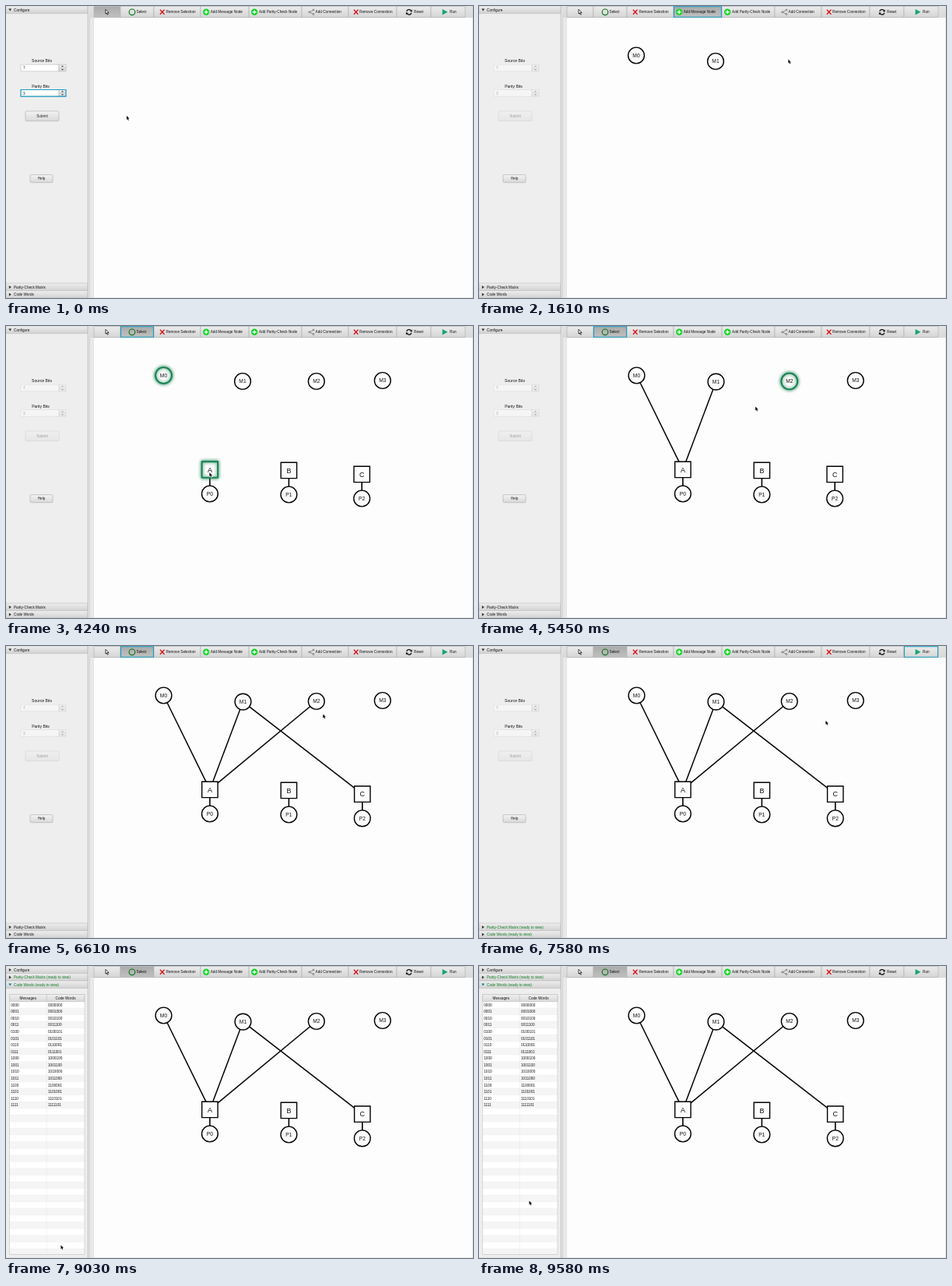
Write an HTML page with a canvas that moves like this. It is 600x375 px and loops after 10 s.

```html
<!DOCTYPE html>
<html lang="en">
<head>
<meta charset="utf-8">
<title>Parity-check graph editor</title>
<style>
html, body { margin: 0; width: 100%; height: 100%; overflow: hidden; background: #fdfdfd; }
canvas { display: block; width: 600px; height: 375px; }
</style>
</head>
<body>
<canvas id="stage" width="600" height="375"></canvas>
<script>
const ctx = document.getElementById('stage').getContext('2d');
const LOOP = 10000, STEP = 30;
const BAR = 9.5, OPEN = 346.5, PANEL = 105;
const GREEN = '#0d7a22', FOCUS = '#1b9cc4', GLOW = '#14804f';

const node = (x, y, at, dx = 0, dy = 0, parity = '') => ({ x, y, at, dx, dy, parity });
const nodes = {
  M0: node(202, 63.5, 1150, .5),
  M1: node(304, 71, 1400, .5, .6),
  M2: node(398.8, 71, 1640),
  M3: node(483.8, 70, 1950),
  A: node(261.3, 184.7, 2560, .6, -.3, 'P0'),
  B: node(363.4, 185.4, 2820, 0, 0, 'P1'),
  C: node(457.2, 190.4, 3120, .6, -.2, 'P2')
};

const spot = (x, y) => ({ x, y });
const spots = {
  start: spot(155, 141), submit: spot(46, 141), message: spot(280, 8),
  check: spot(346, 8), canvas: spot(411.2, 188), select: spot(170, 8),
  low: spot(261.4, 188.2), connect: spot(410, 9), drift: spot(407.3, 87.5),
  run: spot(570, 8), matrix: spot(74, 358), codes: spot(74, 368),
  table: spot(65, 344), end: spot(64.5, 301.5)
};
for (const name in nodes) spots[name] = spot(nodes[name].x - 1.4, nodes[name].y - 2.4);

// Pointer stops as place@arrival, with an optional +wait
const stops = `start@0+150 submit@450+110 message@900+80 M0@1130 M1@1370 M2@1590+80
  M3@1920 check@2240 A@2530 B@2790 canvas@2960+30 C@3090 select@3470 M0@3800
  low@4130+130 connect@4420 M1@4660 A@4880 connect@5110 M2@5330 A@5570
  connect@5820 M1@5990 C@6150 connect@6400 drift@6590 run@7000+400
  matrix@7950+180 codes@8300+530 table@9270+0 end@9560`
  .split(/\s+/).map(entry => {
    const [place, at, wait = 50] = entry.split(/[@+]/);
    return { ...spots[place], at: +at, leave: +at + +wait };
  });

// Each pair is picked node by node, then joined
const pair = (a, fromA, b, fromB, joined) => ({ from: { [a]: fromA, [b]: fromB }, ends: [a, b], joined });
const pairs = [
  pair('M0', 3830, 'A', 4140, 4440),
  pair('M1', 4680, 'A', 4910, 5140),
  pair('M2', 5350, 'A', 5600, 5840),
  pair('M1', 6010, 'C', 6170, 6430)
];

const tool = (left, iconX, textX, label, icon) => ({ left, iconX, textX, label, icon });
const tools = [
  tool(113, 130, 0, '', 'arrow'),
  tool(147, 162, 167.5, 'Select', 'ring'),
  tool(190, 200.7, 205.5, 'Remove Selection', 'cross'),
  tool(250, 257.2, 262.7, 'Add Message Node', 'plus'),
  tool(312, 319.2, 325, 'Add Parity-Check Node', 'plus'),
  tool(380, 392.5, 397.5, 'Add Connection', 'link'),
  tool(440, 449.7, 454, 'Remove Connection', 'cross'),
  tool(502, 517.8, 524, 'Reset', 'cycle'),
  tool(546, 563.8, 570, 'Run', 'play')
];
const toolRight = i => i + 1 < tools.length ? tools[i + 1].left : 590;

const ramp = (t, start, length) => Math.max(0, Math.min(1, (t - start) / length));

function text(label, x, y, size = 4.7, color = '#111', align = 'left') {
  ctx.save();
  ctx.translate(x, y + size * .36);
  ctx.scale(.1, .1);
  ctx.font = `${size * 10}px "Liberation Sans", Arial, sans-serif`;
  ctx.textAlign = align;
  ctx.fillStyle = color;
  ctx.fillText(label, 0, 0);
  ctx.restore();
}

function paint(fill, stroke, lineWidth = 1) {
  if (fill) { ctx.fillStyle = fill; ctx.fill(); }
  if (stroke) { ctx.strokeStyle = stroke; ctx.lineWidth = lineWidth; ctx.stroke(); }
}

function rect(x, y, w, h, fill, stroke, lineWidth = .6) {
  ctx.beginPath();
  ctx.rect(x, y, w, h);
  paint(fill, stroke, lineWidth);
}

function poly(points, fill, stroke, lineWidth, open) {
  ctx.beginPath();
  points.forEach(([x, y]) => ctx.lineTo(x, y));
  if (!open) ctx.closePath();
  paint(fill, stroke, lineWidth);
}

function line(x1, y1, x2, y2, color, width) {
  poly([[x1, y1], [x2, y2]], null, color, width, true);
}

function circle(x, y, r, fill, stroke, width) {
  ctx.beginPath();
  ctx.arc(x, y, r, 0, Math.PI * 2);
  paint(fill, stroke, width);
}

function shade(y, h, top, bottom) {
  const g = ctx.createLinearGradient(0, y, 0, y + h);
  g.addColorStop(0, top);
  g.addColorStop(1, bottom);
  return g;
}

function clipped(y, h, draw) {
  if (h <= 0) return;
  ctx.save();
  ctx.beginPath();
  ctx.rect(0, y, PANEL, h);
  ctx.clip();
  draw();
  ctx.restore();
}

function pointer(x, y, scale, fill, stroke, width) {
  const shape = [[0, 0], [0, 5.2], [1.2, 4.2], [2.1, 6.2], [3, 5.8], [2.1, 3.9], [3.7, 3.8]];
  ctx.lineJoin = 'round';
  poly(shape.map(([px, py]) => [x + px * scale, y + py * scale]), fill, stroke, width);
  ctx.lineJoin = 'miter';
}

const icons = {
  arrow(x, y) { pointer(x - 2, y - 3.5, 1.1, '#fff', '#111', .8); },
  ring(x, y) { circle(x, y, 3.8, null, '#0b7a1d', 1.2); },
  cross(x, y) {
    for (const s of [-1, 1]) line(x - 2.8 * s, y - 3, x + 2.8 * s, y + 3, '#d8161b', 1.4);
  },
  plus(x, y) {
    circle(x, y, 4.2, '#16d62a');
    line(x - 2.5, y, x + 2.5, y, '#fff', 1.3);
    line(x, y - 2.5, x, y + 2.5, '#fff', 1.3);
  },
  link(x, y) {
    for (const s of [-1, 1]) {
      line(x - 2.5, y, x + 2.3, y + 2.6 * s, '#666', .7);
      circle(x + 2.5, y + 2.7 * s, 1, '#ddd', '#555', .6);
    }
    circle(x - 2.8, y, 1, '#ddd', '#555', .6);
  },
  cycle(x, y) {
    for (const turn of [0, Math.PI]) {
      ctx.save();
      ctx.translate(x, y);
      ctx.rotate(turn);
      ctx.beginPath();
      ctx.arc(0, 0, 3.2, Math.PI * 1.08, Math.PI * 1.8);
      paint(null, '#111', 1.2);
      poly([[3.9, -3.4], [3.9, -.4], [1, -.9]], '#111');
      ctx.restore();
    }
  },
  play(x, y) { poly([[x - 3.2, y - 3.7], [x + 3.7, y], [x - 3.2, y + 3.7]], '#16a673'); }
};

function toolbar(t) {
  rect(107, 0, 493, 15, shade(0, 15, '#e3e3e3', '#d9d9d9'));
  const active = t < 950 ? 0 : t < 2270 ? 3 : t < 3500 ? 4 : 1;
  const focused = t < 950 ? -1 : t < 7040 ? active : t < 8090 ? 8 : -1;
  tools.forEach(({ left, iconX, textX, label, icon }, i) => {
    const fill = i === active ? shade(0, 15, '#aaa', '#c0c0c0') : shade(0, 15, '#ededed', '#d4d4d4');
    rect(left, .4, toolRight(i) - left, 14.2, fill, '#b2b2b2', .7);
    icons[icon](iconX, 7.8);
    if (label) text(label, textX, 7.8);
  });
  if (focused >= 0) {
    const { left } = tools[focused];
    rect(left + .5, .8, toolRight(focused) - left - 1, 13.4, null, FOCUS, 1.1);
  }
}

function button(label, x, y, w, h) {
  ctx.beginPath();
  ctx.roundRect(x, y, w, h, 1.2);
  paint(shade(y, h, '#f3f3f3', '#d9d9d9'), '#b4b4b4', .7);
  text(label, x + w / 2, y + h / 2, 4.7, '#222', 'center');
}

function spinner(value, y, focus) {
  rect(19, y - 4.3, 49, 8.6, '#fff', '#bcbcbc');
  rect(68, y - 4.3, 9, 8.6, shade(y - 4.3, 8.6, '#f2f2f2', '#d6d6d6'), '#b4b4b4');
  line(68, y, 77, y, '#b4b4b4', .5);
  for (const s of [-1, 1]) poly([[71, y + 1.4 * s], [72.5, y + 3 * s], [74, y + 1.4 * s]], '#333');
  text(value, 22, y + .1, 4.7, '#222');
  if (focus) rect(19, y - 4.3, 58, 8.6, null, FOCUS, 1.1);
}

function configure(shift, submitted) {
  ctx.save();
  ctx.translate(0, -shift);
  text('Source Bits', 46, 69.8, 5.05, '#111', 'center');
  text('Parity Bits', 44.5, 102.8, 5.05, '#111', 'center');
  button('Help', 31, 216.7, 29, 10);
  ctx.globalAlpha = submitted ? .38 : 1;
  spinner('7', 79.5, false);
  spinner('3', 111.8, !submitted);
  button('Submit', 25, 135, 43, 12.7);
  ctx.restore();
}

function codeTable(top) {
  const y0 = top + 8, rowH = 8.58, y1 = y0 + 9.2, bottom = top + 342;
  for (let i = 0; y1 + i * rowH < bottom; i++) {
    const y = y1 + i * rowH, h = Math.min(rowH, bottom - y);
    rect(4.5, y, 96.5, h, i % 2 ? '#f5f5f5' : '#fff');
    line(4.5, y + h, 101, y + h, '#e6e6e6', .5);
    if (i > 15) continue;
    const bits = i.toString(2).padStart(4, '0');
    const [a, b, c] = [...bits].map(Number);
    text(bits, 6.2, y + 4.3);
    text(`${bits}${a ^ b ^ c}0${b}`, 54, y + 4.3);
  }
  rect(4.5, y0, 96.5, 9.2, shade(y0, 9.2, '#f0f0f0', '#d8d8d8'), '#bbb', .5);
  line(52.2, y0, 52.2, y1, '#bbb', .6);
  line(52.2, y1, 52.2, bottom, '#e2e2e2', .5);
  text('Messages', 28.3, y0 + 4.7, 4.7, '#111', 'center');
  text('Code Words', 76.5, y0 + 4.7, 4.7, '#111', 'center');
  rect(4.5, y0, 96.5, bottom - y0, null, '#c4c4c4', .6);
}

function titleBar(label, y, open, color, focused) {
  rect(0, y, PANEL, BAR, shade(y, BAR, '#eee', '#d2d2d2'), '#bdbdbd', .6);
  ctx.save();
  ctx.translate(5.2, y + 4.9);
  ctx.rotate(open * Math.PI / 2);
  poly([[-1.3, -2], [1.7, 0], [-1.3, 2]], focused ? '#0a84a8' : '#333');
  ctx.restore();
  text(label, 10, y + 5, 4.68, color);
}

function sidePanel(t) {
  rect(0, 0, 107, 375, '#eee');
  const toMatrix = t < 8090 ? 0 : ramp(t, 8057, 90.8);
  const toCodes = ramp(t, 8790, 90);
  const openMatrix = toMatrix * (1 - toCodes);
  const configH = OPEN * (1 - toMatrix), matrixH = OPEN * openMatrix;
  const matrixY = BAR + configH, codesY = matrixY + BAR + matrixH;
  const ready = t >= 7080, suffix = ready ? ' (ready to view)' : '';
  const color = ready ? GREEN : '#111';

  clipped(BAR, configH, () => configure(Math.min(49.7, (OPEN - configH) / 2), t >= 520));
  clipped(matrixY + BAR, matrixH, () =>
    ['1110100', '0000010', '0100001'].forEach((row, i) =>
      text(row, 52.4, matrixY + BAR + 28.3 + i * 17.2, 17.1, '#111', 'center')));
  clipped(codesY + BAR, OPEN * toCodes, () => codeTable(codesY + BAR));

  titleBar('Configure', 0, 1 - toMatrix, '#111', false);
  titleBar('Parity-Check Matrix' + suffix, matrixY, openMatrix, color, t >= 8090 && t < 8790);
  titleBar('Code Words' + suffix, codesY, toCodes, color, t >= 8790);
  rect(105, 0, 8, 375, '#e9e9e9');
  line(105.2, 0, 105.2, 375, '#b9b9b9', .8);
  line(107.3, 0, 107.3, 375, '#c4c4c4', .7);
  line(112.5, 15, 112.5, 375, '#e0e0e0', .6);
}

function place(name, t) {
  const n = nodes[name];
  const moved = pairs.some(p => t >= p.from[name]);
  return moved ? [n.x + n.dx, n.y + n.dy] : [n.x, n.y];
}

function graph(t) {
  for (const { ends: [a, b], joined } of pairs) {
    if (t >= joined) line(...place(a, t), ...place(b, t), '#000', 1.5);
  }
  for (const [name, n] of Object.entries(nodes)) {
    if (t < n.at) continue;
    const [x, y] = place(name, t);
    const picked = pairs.some(p => t >= p.from[name] && t < p.joined);
    const ink = picked ? GLOW : '#000', width = picked ? 1.9 : 1.4;
    if (n.parity) {
      line(x, y + 10, x, y + 21, '#000', 1.6);
      circle(x, y + 31.1, 10.4, '#fdfdfd', '#000', 1.4);
      text(n.parity, x, y + 31.1, 6.7, '#111', 'center');
    }
    ctx.save();
    if (picked) { ctx.shadowColor = GLOW; ctx.shadowBlur = 4; }
    if (n.parity) rect(x - 10.2, y - 10.2, 20.4, 20.4, '#fdfdfd', ink, width);
    else circle(x, y, 10.4, '#fdfdfd', ink, width);
    ctx.restore();
    text(name, x, y, n.parity ? 9 : 6.7, '#111', 'center');
  }
}

function pointerAt(t) {
  const next = stops.findIndex(s => s.at > t);
  if (next < 0) return [spots.end.x, spots.end.y];
  const a = stops[next - 1], b = stops[next];
  const k = ramp(t, a.leave, b.at - a.leave), e = k * k * (3 - 2 * k);
  return [a.x + (b.x - a.x) * e, a.y + (b.y - a.y) * e];
}

function draw(t) {
  rect(0, 0, 600, 375, '#fdfdfd');
  sidePanel(t);
  graph(t);
  toolbar(t);
  line(599.7, 0, 599.7, 375, '#d0d0d0', .6);
  line(0, 374.8, 600, 374.8, '#c8c8c8', .5);
  const [x, y] = pointerAt(t);
  pointer(x, y, .95, '#000', '#fff', 1.2);
  pointer(x, y, .95, '#000');
}

function tick() {
  const t = performance.now() % LOOP;
  draw(Math.max(0, Math.floor((t - 20) / STEP) * STEP + 20));
  requestAnimationFrame(tick);
}
tick();
</script>
</body>
</html>
```
